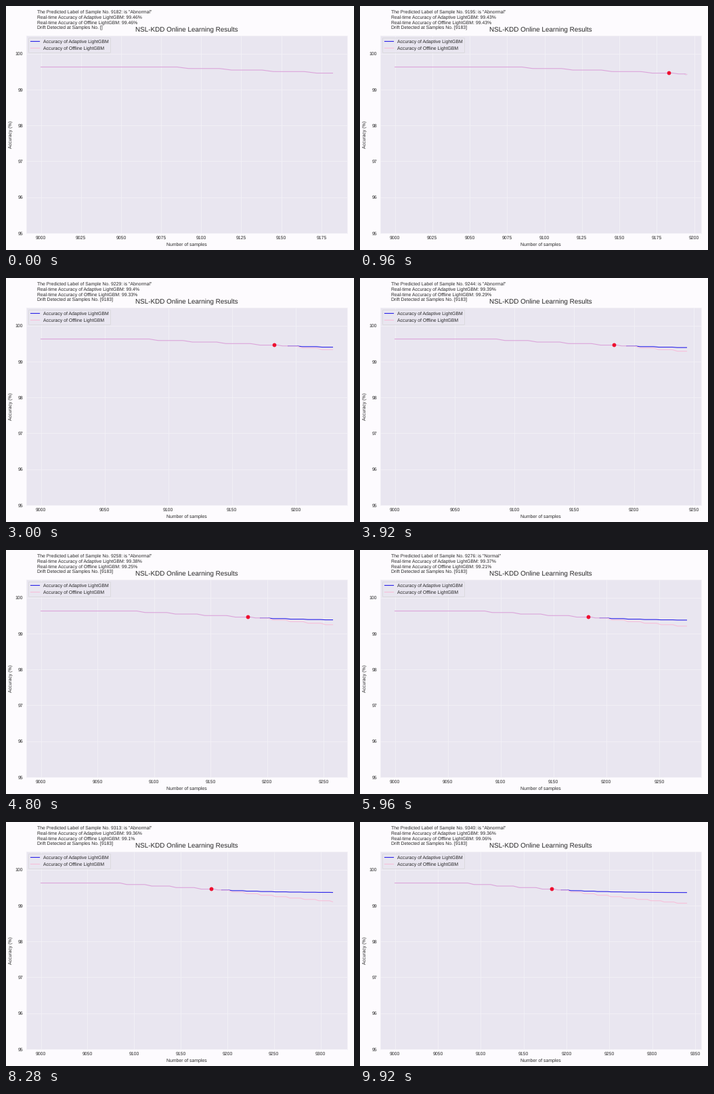
Animation, 514 px wide and 362 px high, one loop 10 s. Source, as a matplotlib script:

```python
import numpy as np
import matplotlib.pyplot as plt
from matplotlib.animation import FuncAnimation
from matplotlib.ticker import MultipleLocator

W, H, DPI = 514, 362, 100
STEP_MS, LOOP_MS = 40, 10000
FIRST, DRIFT, SPLIT, LAST = 9000, 183, 194, 340
INK, PAPER, PANEL, GRID = "#262626", "#fdfbfe", "#e9e6f0", "#f3f1f7"
BLUE, PINK, PLUM, RED = "#2a22e8", "#f7c0da", "#dba4da", "#ee1030"

plt.rcParams.update({
    "font.family": "Liberation Sans", "font.size": 4.97,
    "text.color": INK, "text.hinting": "none",
    "lines.linewidth": 0.8, "patch.linewidth": 0.5,
})


def stairs(u, rise=0.27):
    """One step per unit: a short ramp, then a flat tread."""
    base = np.floor(u)
    return base + np.minimum((u - base) / rise, 1)


def adaptive_acc(n):
    early = 99.627 - 0.0425 * stairs(np.maximum((n - 85) / 26.5, 0))
    late = 99.355 + 0.082 * np.exp(-since_split(n) / 55)
    return np.where(n < DRIFT, early, late)


def offline_acc(n):
    return adaptive_acc(n) - 0.0021 * np.maximum(since_split(n), 0)


def since_split(n):
    return 2 + 15.5 * stairs((n - 201) / 15.5)


def sample_at(ms):
    """The stream pauses at the drift, then slows down gently."""
    if ms < 120:
        return DRIFT - 1
    if ms < 280:
        return DRIFT
    return int(np.interp(ms, [280, 1960, 7160, 9920],
                         [184, 212.5, 296.1, LAST + 0.05]))


def label_of(n):
    return "Normal" if n % 7 in (1, 2, 3) else "Abnormal"


fig = plt.figure(figsize=(W / DPI, H / DPI), dpi=DPI, facecolor=PAPER)
ax = fig.add_axes([30 / W, 25 / H, 474 / W, 293 / H], facecolor=PANEL)


def put(x, y, text="", **style):
    return fig.text(x / W, 1 - y / H, text, **style)


ax.set_ylim(95, 100.5)
ax.yaxis.set_major_locator(MultipleLocator(1))
ax.set_axisbelow(True)
ax.grid(color=GRID, lw=0.6)
ax.tick_params(length=0, labelcolor=INK)
ax.tick_params(axis="x", pad=3.1)
ax.tick_params(axis="y", pad=3.4)
for spine in ax.spines.values():
    spine.set(color=GRID, linewidth=0.6)

shared, = ax.plot([], [], color=PLUM)
adaptive, = ax.plot([], [], color=BLUE, label="Accuracy of Adaptive LightGBM")
offline, = ax.plot([], [], color=PINK, label="Accuracy of Offline LightGBM")
dot, = ax.plot([FIRST + DRIFT], [adaptive_acc(DRIFT)], "o", color=RED,
               ms=4.2, mew=0, zorder=3)
ax.legend(handles=[adaptive, offline], loc="upper left", borderaxespad=0.42,
          facecolor=PANEL, edgecolor="0.82")

put(267, 38, "NSL-KDD Online Learning Results", ha="center", fontsize=7.1)
put(267, 356, "Number of samples", ha="center")
put(7, 190.5, "Accuracy (%)", ha="center", va="center", rotation=90)
info = [put(45.5, 11 + 7.67 * row) for row in range(4)]


def draw(i):
    n = sample_at(i * STEP_MS)
    before = np.arange(min(n, SPLIT) + 1)
    after = np.arange(SPLIT, n + 1)
    shared.set_data(FIRST + before, adaptive_acc(before))
    adaptive.set_data(FIRST + after, adaptive_acc(after))
    offline.set_data(FIRST + after, offline_acc(after))

    drifted = n >= DRIFT
    dot.set_visible(drifted)
    ax.set_xlim(FIRST - 0.05 * n, FIRST + 1.05 * n)
    ax.xaxis.set_major_locator(MultipleLocator(25 if 1.1 * n <= 225 else 50))

    ours, theirs = (round(float(f(n)), 2) for f in (adaptive_acc, offline_acc))
    lines = (
        f'The Predicted Label of Sample No. {FIRST + n}: is "{label_of(n)}"',
        f"Real-time Accuracy of Adaptive LightGBM: {ours}%",
        f"Real-time Accuracy of Offline LightGBM: {theirs}%",
        f"Drift Detected at Samples No. {[FIRST + DRIFT] if drifted else []}",
    )
    for slot, text in zip(info, lines):
        slot.set_text(text)
    return shared, adaptive, offline, dot, *info


anim = FuncAnimation(fig, draw, frames=LOOP_MS // STEP_MS, interval=STEP_MS,
                     repeat=True, repeat_delay=0)
plt.show()
```
